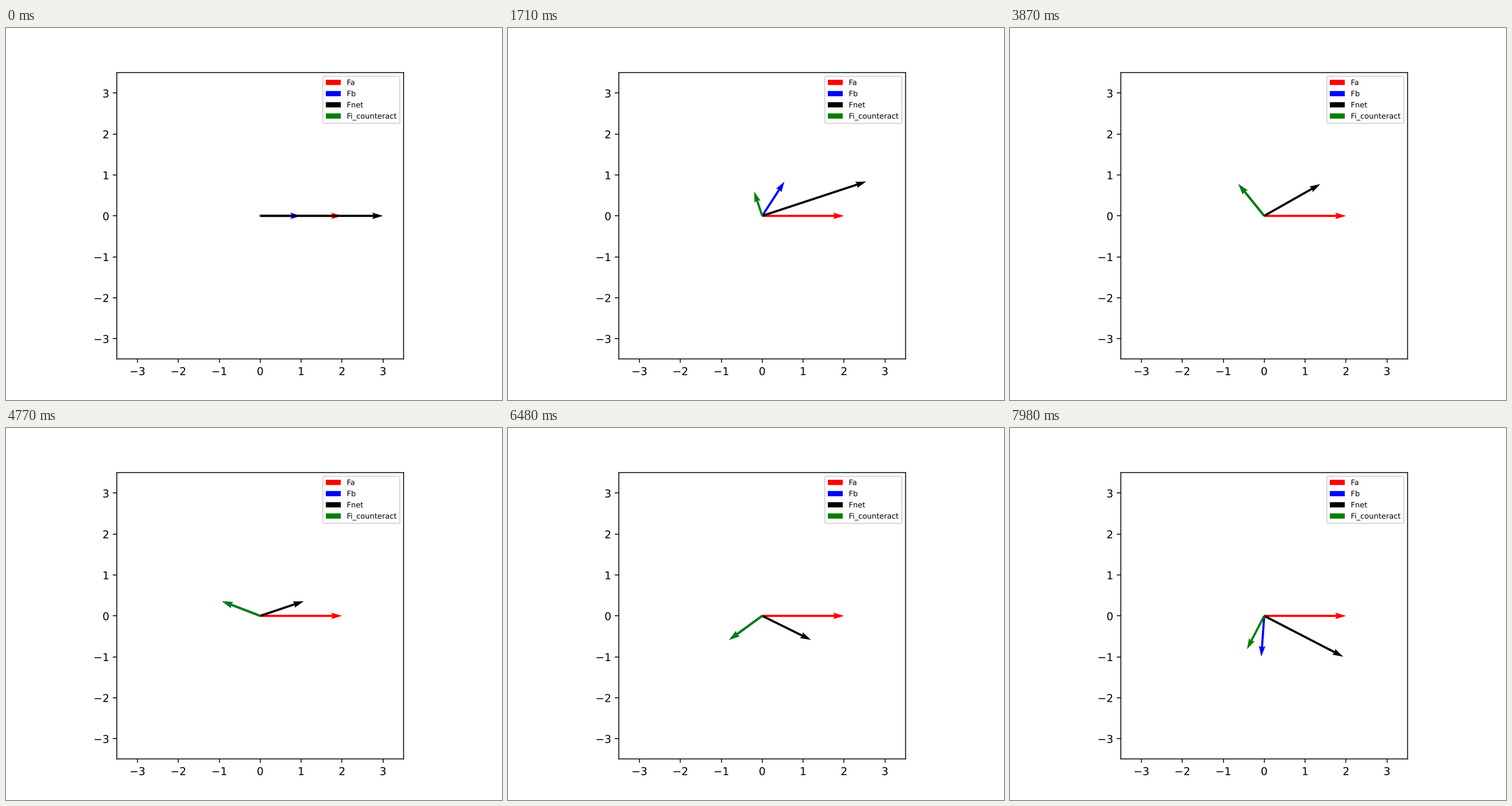
Recreate the animation shown at these times as a matplotlib script. Size 864x648 px, loop 8 s.

```python
import numpy as np
import matplotlib.pyplot as plt
from matplotlib.animation import FuncAnimation
from matplotlib.patheffects import Normal

LOOP_MS = 8000
FRAMES = 267          # the angle advances one degree per frame
FA = np.array([2.0, 0.0])

# Plot box on a 1280 x 960 layout grid, measured from the lower left
GRID_W, GRID_H = 1280, 960
LEFT, RIGHT, BOTTOM, TOP = 286, 1026, 106, 845
ORIGIN_X, ORIGIN_Y, UNIT = 656, 475.2, 105.6

fig = plt.figure(figsize=(6.4, 4.8), dpi=135)
ax = fig.add_axes([LEFT / GRID_W, BOTTOM / GRID_H,
                   (RIGHT - LEFT) / GRID_W, (TOP - BOTTOM) / GRID_H])
ax.set_xlim((LEFT - ORIGIN_X) / UNIT, (RIGHT - ORIGIN_X) / UNIT)
ax.set_ylim((BOTTOM - ORIGIN_Y) / UNIT, (TOP - ORIGIN_Y) / UNIT)
ax.set_xticks(range(-3, 4))
ax.set_yticks(range(-3, 4))


def add_arrow(color, label):
    return ax.quiver(0, 0, 1, 0, color=color, label=label,
                     angles="xy", scale_units="xy", scale=1)


arrows = [
    add_arrow("red", "Fa"),
    add_arrow("blue", "Fb"),
    add_arrow("black", "Fnet"),
    add_arrow("green", "Fi_counteract"),
]
legend = ax.legend(loc="upper right", fontsize="x-small")

# Keep boxes and lettering at fractional pixel positions
for box in [*ax.spines.values(), legend.get_frame(), *legend.get_patches()]:
    box.set_snap(False)
for text in [*ax.get_xticklabels(), *ax.get_yticklabels(),
             *legend.get_texts()]:
    text.set_path_effects([Normal()])


def counteract(force, net):
    """Part of force across net, or all of it when it opposes net."""
    along = force @ net
    if along < 0:
        return force
    return force - along / (net @ net) * net


def update(deg):
    angle = np.radians(deg)
    fb = np.array([np.cos(angle), np.sin(angle)])
    net = FA + fb
    for arrow, vec in zip(arrows, (FA, fb, net, counteract(fb, net))):
        arrow.set_UVC(*vec)
    legend.set_loc("upper left" if 60 <= deg <= 120 else "upper right")
    return arrows


anim = FuncAnimation(fig, update, frames=FRAMES, interval=LOOP_MS / FRAMES,
                     init_func=lambda: update(0), repeat=True, repeat_delay=0)
plt.show()
```
